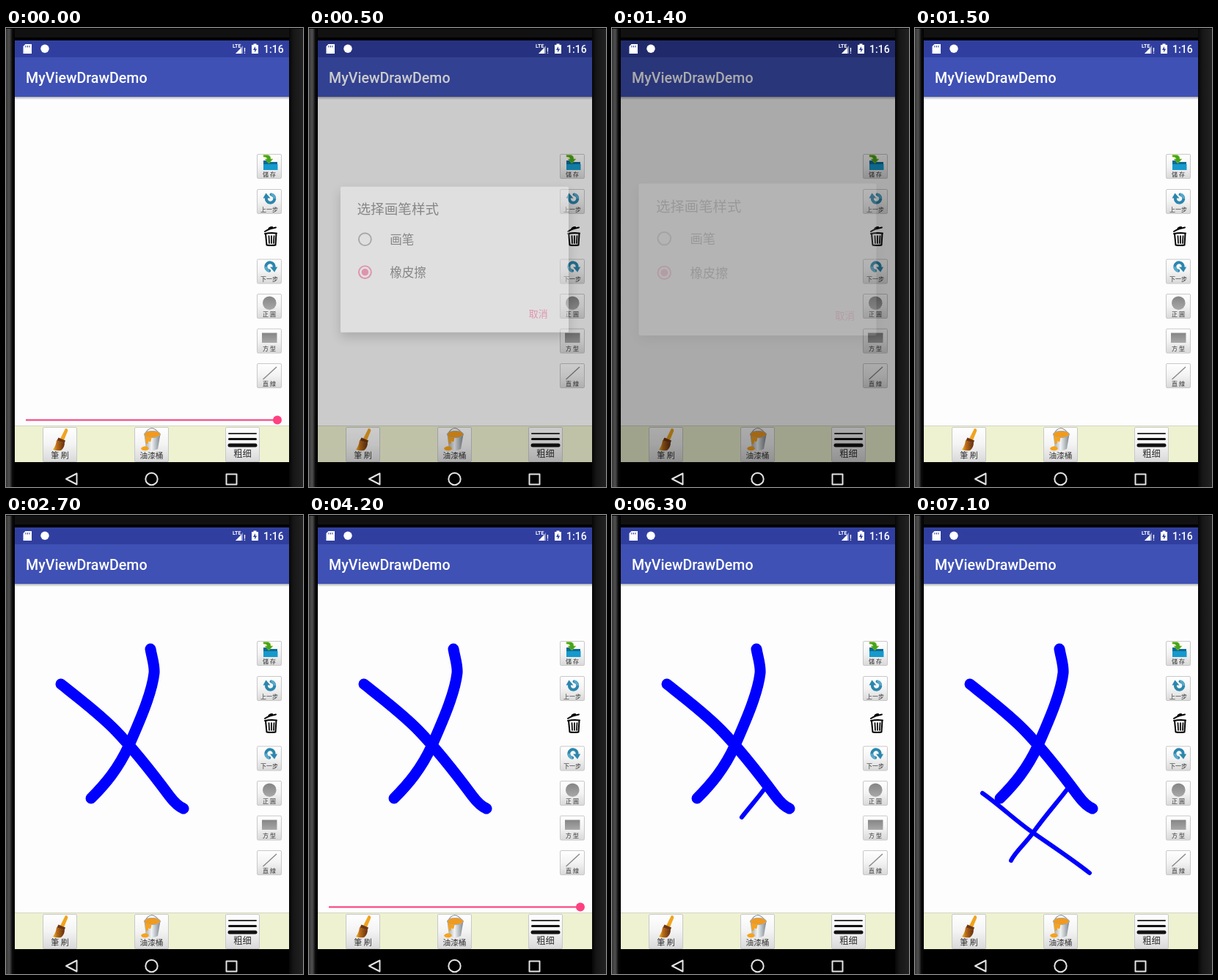
An HTML page for the animation above (8 s loop, 405 by 627 pixels).

```html
<!DOCTYPE html>
<html lang="zh">
<head>
<meta charset="utf-8">
<title>Drawing demo</title>
<style>
  html, body { margin: 0; width: 100%; height: 100%; overflow: hidden; background: #000; }
  svg { display: block; width: 405px; height: 627px; }
  text { font-family: "Noto Sans CJK SC", "Noto Sans CJK", sans-serif; }
  .latin { font-family: Roboto, sans-serif; font-weight: 500; fill: #fff; }
  .label { font-family: "Noto Sans CJK TC", "Noto Sans CJK", sans-serif; text-anchor: middle; fill: #333; }
  .ink path { fill: none; stroke: #00f; stroke-linecap: round; stroke-linejoin: round; }
  .line { fill: none; stroke-linecap: round; stroke-linejoin: round; }
  #dialog { filter: drop-shadow(0 7px 8px rgba(0, 0, 0, .4)); transform-origin: 198px 316px; }
</style>
</head>
<body>
<svg viewBox="0 0 405 627">
  <defs>
    <linearGradient id="bezel">
      <stop offset="0" stop-color="#363636"/><stop offset=".35" stop-color="#505050"/>
      <stop offset=".55" stop-color="#303030"/><stop offset=".7" stop-color="#0c0c0c"/>
      <stop offset="1" stop-color="#000"/>
    </linearGradient>
    <linearGradient id="edge">
      <stop offset="0" stop-color="#060606"/><stop offset=".3" stop-color="#161616"/>
      <stop offset="1" stop-color="#222"/>
    </linearGradient>
    <linearGradient id="key" x2="0" y2="1">
      <stop offset="0" stop-color="#fff"/><stop offset=".5" stop-color="#f3f3f3"/>
      <stop offset="1" stop-color="#d9d9d9"/>
    </linearGradient>
    <linearGradient id="gray" x2="0" y2="1">
      <stop offset="0" stop-color="#858585"/><stop offset="1" stop-color="#a8a8a8"/>
    </linearGradient>
    <linearGradient id="shade" x2="0" y2="1">
      <stop offset="0" stop-color="#000" stop-opacity=".3"/><stop offset="1" stop-color="#000" stop-opacity="0"/>
    </linearGradient>
    <linearGradient id="pail">
      <stop offset="0" stop-color="#98a2aa"/><stop offset=".45" stop-color="#f2f4f5"/>
      <stop offset="1" stop-color="#7b868e"/>
    </linearGradient>
    <linearGradient id="bristles">
      <stop offset="0" stop-color="#f3b629"/><stop offset=".35" stop-color="#b96a17"/>
      <stop offset="1" stop-color="#5e2c10"/>
    </linearGradient>
  </defs>

  <!-- phone -->
  <rect width="405" height="627"/>
  <rect width="405" height="13" fill="#111"/>
  <rect width="12" height="627" fill="url(#bezel)"/>
  <rect x="386" width="19" height="627" fill="url(#edge)"/>
  <rect width="405" height="1" fill="#000"/>

  <!-- screen -->
  <rect x="12" y="17" width="374" height="23" fill="#303f9f"/>
  <rect x="12" y="94" width="374" height="450" fill="#fdfdfd"/>
  <rect x="12" y="94" width="374" height="4" fill="url(#shade)"/>
  <rect x="12" y="40" width="374" height="54" fill="#3f51b5"/>
  <text class="latin" x="27" y="75" font-size="19.6">MyViewDrawDemo</text>

  <g class="ink" id="ink"></g>
  <g id="slider">
    <rect id="strip" x="12" y="527" width="374" height="16" fill="#f8f8f8"/>
    <path d="M27 535.5H370" stroke="#dcdcdc" stroke-width="2"/>
    <path id="track" stroke="#ff4081" stroke-width="2"/>
    <rect id="ripple" y="527" width="31" height="16" rx="6" fill="#000"/>
    <circle id="thumb" cy="535.5" fill="#ff4081"/>
  </g>

  <rect x="12" y="543" width="374" height="50" fill="#eef2d1"/>
  <path d="M12 543.5H386" stroke="#d4d6c6"/>
  <g id="keys"></g>

  <!-- save -->
  <path d="M351 181h7l2 2h10v11h-19z" fill="#0b6a94"/>
  <path d="M351 186h19.500v8h-19.500z" fill="#1699cc"/>
  <path d="M351 173.500h5q5 0 5 5.500h3l-5.500 6-5.500-6h3q0-3-5-3z" fill="#45a520" stroke="#a5c828" stroke-width=".6"/>
  <!-- undo, redo -->
  <g id="undo" transform="translate(360.500 233)">
    <path class="line" d="M-5.500-1A5.700 5.700 0 1 0 1-5.600" stroke="#2c86ad" stroke-width="4" stroke-linecap="butt"/>
    <path d="M1-7.600Q7-7 7.500 0H4Q4-4 1-4z" fill="#59aacb"/>
    <path d="M-10-.5L-6-7.500L0-.5z" fill="#2c86ad"/>
  </g>
  <use href="#undo" transform="rotate(180 360.300 279.500)"/>
  <!-- trash -->
  <g class="line" stroke="#000" stroke-width="2">
    <path d="M353 278q6-4 15-5.500M358 275q1-3 5-3M353 281q8-1.500 16-.5M354 281l1.500 15.500q6 1 12 0l1-15.500"/>
    <path d="M358.500 284l.5 10M362 284v10M365.500 284l-.5 10" stroke-width="1.700"/>
  </g>
  <!-- shapes -->
  <circle cx="359.300" cy="375.700" r="9.300" fill="url(#gray)"/>
  <rect x="349" y="416.500" width="20.500" height="13.500" fill="url(#gray)"/>
  <path d="M350.500 480L369 463" stroke="#858585" stroke-width="1.300"/>
  <!-- brush -->
  <path d="M81 547q4 0 3 4l-5 12-5-2z" fill="#f0a41f"/>
  <path d="M71.500 559.500l9.500 4-1.500 4-10-4z" fill="#6f3513"/>
  <path d="M69 563l11 4.500q-1 7-5 9.500-6 1-11-1 4-5 5-13z" fill="url(#bristles)"/>
  <!-- bucket -->
  <path class="line" d="M189 555q9-16 20-1" stroke="#888" stroke-width="1.200"/>
  <path d="M188.500 555l2.500 20q9 4 16 0l3.500-20z" fill="url(#pail)"/>
  <ellipse cx="199.500" cy="555" rx="11" ry="4.500" fill="#f29a1c" stroke="#a4abb0"/>
  <path d="M189.500 557q5 3 9 2.500l-1 5q-2 2-3-1l-1 4q-3 2-3-2z" fill="#f6a21d"/>
  <path d="M184 574q4-4 9-2 4 3-1 5-7 1-8-3z" fill="#f6a21d"/>
  <!-- widths -->
  <g class="line" stroke="#111">
    <path d="M304 554h37" stroke-width="2" stroke="#333"/>
    <path d="M304.500 561.500h36" stroke-width="3"/>
    <path d="M305 570h35" stroke-width="5"/>
  </g>

  <rect id="dim" x="12" y="17" width="374" height="576"/>
  <g id="dialog">
    <rect x="36.500" y="212.500" width="324" height="207.500" rx="2" fill="#fff"/>
    <text x="60" y="251" font-size="19.4" fill="#212121">选择画笔样式</text>
    <text x="106.500" y="294" font-size="17.3" fill="#212121">画笔</text>
    <text x="106.500" y="340.500" font-size="17.3" fill="#212121">橡皮擦</text>
    <circle cx="71.300" cy="287.500" r="8.800" fill="none" stroke="#757575" stroke-width="2"/>
    <circle cx="71.300" cy="334.300" r="8.800" fill="none" stroke="#ff4081" stroke-width="2"/>
    <circle cx="71.300" cy="334.300" r="5" fill="#ff4081"/>
    <text x="304" y="398" font-size="13.5" fill="#ff4081">取消</text>
  </g>

  <!-- status icons -->
  <path d="M26.500 22H35v13H23.500V25z" fill="#fff"/>
  <path d="M27 24v2.500M29.500 24v2.500M32 24v2.500" stroke="#303f9f"/>
  <circle cx="53" cy="28.300" r="5.700" fill="#fff"/>
  <path d="M313 35L323 24V35z" fill="#fff" opacity=".45"/>
  <path d="M313 35l8-8v8z" fill="#fff"/>
  <text class="latin" x="309" y="27" font-size="7" style="font-weight:700">LTE</text>
  <text class="latin" x="324" y="35" font-size="11">!</text>
  <path d="M337.500 21.500h4v1.500h2.500v12h-9v-12h2.500z" fill="#fff"/>
  <path d="M340 25l-3 5h2.200v3.500l3-5h-2.200z" fill="#303f9f"/>
  <text class="latin" x="351" y="34" font-size="14">1:16</text>

  <!-- navigation -->
  <g class="line" stroke="#e4e4e4" stroke-width="2">
    <path d="M82 616L96.500 608.500V623.500z"/>
    <circle cx="198.500" cy="616" r="8.200"/>
    <rect x="300.500" y="609.500" width="14" height="14"/>
  </g>
</svg>
<script>
const LOOP = 8000;
const $ = id => document.getElementById(id);

function add(parent, tag, attrs, text = "") {
  const node = document.createElementNS("http://www.w3.org/2000/svg", tag);
  set(node, attrs);
  node.textContent = text;
  return parent.appendChild(node);
}
function set(node, attrs) {
  for (const name in attrs) node.setAttribute(name, attrs[name]);
}

function addKey(x, y, w, h, label, size, baseline) {
  const box = { x: x + .5, y: y + .5, width: w - 1, height: h - 1, rx: 1.5 };
  add($("keys"), "rect", { ...box, fill: "url(#key)", stroke: "#c8c8c8" });
  add($("keys"), "text", { class: "label", x: x + w / 2, y: baseline, "font-size": size }, label);
}
const sideKeys = [[172, "儲 存"], [220, "上一步"], [315.5, "下一步"], [363, "正 圓"], [410.5, "方 型"], [458, "直 線"]];
for (const [y, label] of sideKeys) addKey(342, y, 34, 34, label, 8, y + 30.5);
addKey(50, 545, 47, 48, "筆 刷", 11, 588);
addKey(175, 545, 47, 48, "油漆桶", 10.7, 588);
addKey(299, 545, 47, 48, "粗细", 12.3, 586);

// Each stroke grows in equal steps of 100 ms.
const strokes = [
  { start: 1800, steps: 4, width: 15, d: "M197 183C199 195 203 206 202 216C199 243 183 280 168 314C153 347 135 368 116 387" },
  { start: 2400, steps: 4, width: 15, d: "M75 231C95 247 128 272 150 295C175 321 200 353 223 384C229 392 235 398 242 401" },
  { start: 6200, steps: 5, width: 6, d: "M208 374C197 389 178 410 161 434C151 448 136 461 131 472" },
  { start: 6800, steps: 4, width: 6, d: "M92 380C115 396 140 420 161 434C188 453 214 470 238 489" }
];
for (const s of strokes) {
  s.node = add($("ink"), "path", { d: s.d, "stroke-width": s.width, pathLength: 1 });
}

// Stepped tracks: [time, value] holds until the next entry.
const tracks = {
  dim: [[0, 0], [500, .2], [600, .45], [700, .6], [1400, .33], [1500, 0]],
  dialog: [[0, 0], [500, .4], [600, .9], [700, 1], [1400, .12], [1500, 0]],
  scale: [[0, 1], [500, .96], [600, .99], [700, 1]],
  slider: [[0, 1], [500, 0], [4200, 1], [6000, 0]],
  thumb: [[0, 370], [4900, 360], [5000, 318], [5100, 262], [5200, 208], [5300, 176], [5500, 187]],
  radius: [[0, 6], [4900, 8.5], [5600, 7], [5700, 6]],
  ripple: [[0, 0], [4900, .14], [5600, .07], [5700, 0]],
  strip: [[0, 0], [4900, 1], [6000, 0]]
};
const valueAt = (name, t) => tracks[name].findLast(([time]) => time <= t)[1];

function render(t) {
  const at = name => valueAt(name, t);
  for (const id of ["dim", "dialog", "slider", "ripple", "strip"]) set($(id), { opacity: at(id) });
  $("dialog").style.transform = `scale(${at("scale")})`;

  const x = at("thumb");
  set($("track"), { d: `M27 535.5H${x}` });
  set($("thumb"), { cx: x, r: at("radius") });
  set($("ripple"), { x: x - 15.5 });

  for (const s of strokes) {
    const step = Math.floor((t - s.start) / 100) + 1;
    const progress = Math.max(0, Math.min(1, step / s.steps));
    set(s.node, {
      "stroke-dasharray": progress < 1 ? `${progress} 2` : "none",
      visibility: progress ? "visible" : "hidden"
    });
  }
}

const origin = performance.now();
function tick() {
  render((performance.now() - origin) % LOOP);
  requestAnimationFrame(tick);
}
tick();
</script>
</body>
</html>
```
